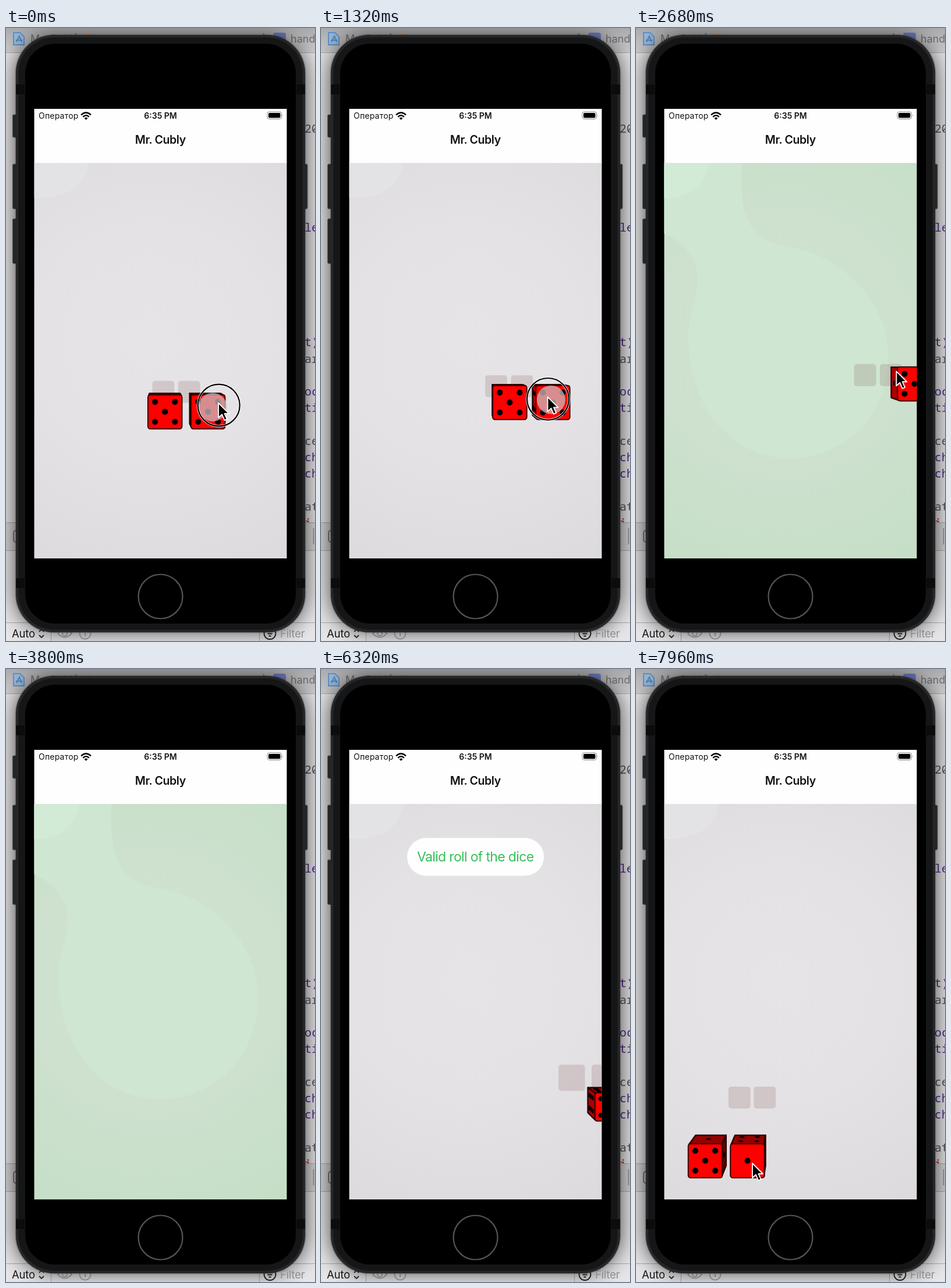
These frames come from a looping animation (531 px wide and 1054 px high, 8 s). An HTML page:

```html
<!DOCTYPE html>
<html>
<head>
<meta charset="utf-8">
<style>
  html, body { margin: 0; width: 100%; height: 100%; overflow: hidden; background: #c9c8ca; }
  svg { display: block; width: 531px; height: 1054px; }
  text { font-family: Inter, "Noto Sans", sans-serif; white-space: pre; }
  .code text { font-family: "Noto Sans Mono", monospace; font-size: 20px; }
</style>
</head>
<body>
<svg viewBox="0 0 531 1054" xmlns="http://www.w3.org/2000/svg">
  <defs>
    <filter id="blur" x="-30%" y="-20%" width="160%" height="140%"><feGaussianBlur stdDeviation="19"/></filter>
    <filter id="soft"><feGaussianBlur stdDeviation="0.8"/></filter>
    <clipPath id="screen"><rect x="48.5" y="232" width="434" height="680"/></clipPath>
    <clipPath id="editor"><rect y="42" width="531" height="808"/></clipPath>
    <linearGradient id="topBar" x2="0" y2="1">
      <stop offset="0" stop-color="#aaa9ab"/><stop offset="1" stop-color="#d0cfd1"/>
    </linearGradient>
    <radialGradient id="grey" gradientUnits="userSpaceOnUse" cx="250" cy="540" r="440">
      <stop offset="0" stop-color="#e6e4e7"/><stop offset=".45" stop-color="#e4e2e5"/><stop offset="1" stop-color="#dcdadd"/>
    </radialGradient>
    <radialGradient id="green" gradientUnits="userSpaceOnUse" cx="250" cy="540" r="440">
      <stop offset="0" stop-color="#cfe3d0"/><stop offset=".5" stop-color="#cde1ce"/><stop offset="1" stop-color="#c5dec6"/>
    </radialGradient>
  </defs>

  <!-- desktop -->
  <rect width="531" height="1054" fill="#e6e5e7"/>
  <rect width="531" height="42" fill="url(#topBar)"/>
  <rect y="850" width="531" height="48" fill="#d6d5d7"/>
  <path d="M0 42.5H531M0 850.5H531M0 898.5H531M0 1022.5H531M77.5 1022V1054M435.5 1022V1054" stroke="#a9a8aa" fill="none"/>
  <rect x="13" y="864" width="20" height="20" rx="4" fill="none" stroke="#77767a" stroke-width="2"/>
  <path d="M528.5 860V888" stroke="#8b8a8d" stroke-width="1.5"/>
  <g class="code" id="code" clip-path="url(#editor)"></g>
  <g opacity=".75">
    <path d="M13 8h11l7 7v14H13z" fill="#8fbbe8" stroke="#4388cd" stroke-width="2"/>
    <path d="M18 24l5-10 4 10M17 21h11" stroke="#3379bd" stroke-width="2" fill="none"/>
    <text x="42" y="25" font-size="18" fill="#555">Mr. Cubly</text>
    <path d="M119 9l5 9-5 9M442 9l5 9-5 9" fill="none" stroke="#666" stroke-width="2"/>
    <path d="M137 10h9l3 3h12v14H137z" fill="#e19a56"/>
    <rect x="459" y="8" width="22" height="21" rx="4" fill="#5569c4"/>
    <text x="489" y="25" font-size="18" fill="#555">hand</text>
  </g>
  <g fill="none" stroke="#aaa9ac" stroke-width="2">
    <path d="M89 1041q12-13 24 0q-12 13-24 0z"/><circle cx="101" cy="1041" r="4"/>
    <circle cx="136" cy="1041" r="9.5"/><path d="M136 1040v6M136 1035v2"/>
  </g>
  <rect x="17" y="16" width="497" height="1020" rx="64" opacity=".72" filter="url(#blur)"/>
  <text x="10" y="1048" font-size="18.5" letter-spacing="-.2" fill="#151515">Auto</text>
  <path d="M57 1038l4-4 4 4M57 1044l4 4 4-4" fill="none" stroke="#222" stroke-width="1.8"/>
  <g fill="none" stroke="#1b1b1b" stroke-width="1.8">
    <circle cx="453.5" cy="1041" r="10"/><path d="M447.5 1037.5h12M449.5 1041.5h8M451.5 1045.5h4"/>
  </g>
  <text x="471" y="1048" font-size="18.5" letter-spacing="-.2" fill="#8d8c8f">Filter</text>

  <!-- phone -->
  <g fill="#242526" stroke="#4a4b4d">
    <rect x="11.5" y="149" width="10" height="39" rx="2"/>
    <rect x="11.5" y="234" width="10" height="77" rx="2"/>
    <rect x="11.5" y="328" width="10" height="77" rx="2"/>
    <rect x="509" y="234" width="9" height="77" rx="2"/>
  </g>
  <rect x="17" y="12" width="497" height="1027" rx="66" fill="#151617"/>
  <rect x="19" y="14" width="493" height="1023" rx="64" fill="none" stroke="#2a2b2c" stroke-width="4" filter="url(#soft)"/>
  <path d="M17 97h15v17H17zM499 97h15v17h-15zM17 946h15v17H17zM499 946h15v17h-15z" fill="#0c0c0d"/>
  <rect x="33" y="27" width="465" height="997" rx="51"/>
  <circle cx="265.5" cy="977.5" r="38" stroke="#555557" stroke-width="2.2"/>

  <!-- app -->
  <rect x="48.5" y="139" width="434" height="94" fill="#fffeff"/>
  <text x="56" y="156" font-size="14" letter-spacing=".2" fill="#111">Оператор</text>
  <path d="M129 149.5q8.500-8 17 0M132.200 152.800q5.300-5 10.600 0" fill="none" stroke="#000" stroke-width="2.4"/>
  <path d="M134.500 155q3-2.500 6 0l-3 3z"/>
  <text x="265.5" y="156" font-size="14" font-weight="600" text-anchor="middle" fill="#111">6:35 PM</text>
  <rect x="449" y="144" width="24.5" height="12.5" rx="3.5" fill="none" stroke="#888"/>
  <rect x="451" y="146" width="20.5" height="8.5" rx="2"/>
  <path d="M475 148.500q1.800 1.700 0 3.500z" fill="#888"/>
  <text x="265.3" y="199" font-size="19.5" font-weight="600" letter-spacing="-.4" text-anchor="middle" fill="#111">Mr. Cubly</text>

  <g clip-path="url(#screen)">
    <g id="greyBg">
      <rect x="48" y="232" width="435" height="680" fill="url(#grey)"/>
      <path d="M48 232H142Q132 294 48 292z" fill="#e6e8e9" opacity=".6"/>
    </g>
    <g id="greenBg">
      <rect x="48" y="232" width="435" height="680" fill="url(#green)"/>
      <path d="M48 232H181C176 340 205 368 264 377C350 392 433 465 433 566C433 665 360 740 265 740C168 740 90 655 90 530C90 485 107 465 106 428C104 390 78 367 48 353z" fill="#cfe7d2"/>
      <path d="M48 232H126Q114 292 48 293z" fill="#d2ebd7"/>
    </g>
    <g id="label">
      <rect x="148" y="290.5" width="235" height="65" rx="32.5" fill="#fffeff"/>
      <text x="265.2" y="331" font-size="23" letter-spacing="-.66" text-anchor="middle" fill="#37bf59">Valid roll of the dice</text>
    </g>
    <g id="dice"></g>
    <circle id="touch" r="24.5" fill="#c9c4c6" opacity=".72"/>
  </g>
  <g id="ring" fill="none">
    <circle r="36" stroke="#fff" stroke-width="4" opacity=".85"/>
    <circle r="36" stroke="#000" stroke-width="2.2"/>
  </g>
  <path id="cursor" d="M0 0V25L6 19.500L10.300 29.500L14.700 27.600L10.400 18H18z" stroke="#fff" stroke-width="1.8" stroke-linejoin="round"/>
</svg>
<script>
const LOOP = 8000, STEP = 40;
const RELEASE = 2480, VALID = 5120, ROLL = 6120, LABEL_END = 7200, REST = 7640, BACK = 7050;
const VX = 266, VY = 574, DEPTH = 0.065;

const $ = id => document.getElementById(id);
const f = v => v.toFixed(2);
const mix = (a, b, u) => a + (b - a) * u;
const show = (id, on) => $(id).style.display = on ? '' : 'none';
const place = (id, x, y) => $(id).setAttribute('transform', `translate(${f(x)} ${f(y)})`);

// one entry per line of the editor behind the phone
$('code').innerHTML = '20,,,,,,le,,,,,,,t),ar,,oc,ti,,ce,ch,ch,,at,i'.split(',').map((word, row) => {
  const color = word === 'i' ? '#b3261e' : /le|t\)|oc|ti|ch/.test(word) ? '#4f2a8a' : '#55545a';
  return word && `<text x="513" y="${180 + row * 28.25}" fill="${color}">${word}</text>`;
}).join('');

// the finger sways while it holds the dice
function finger(t) {
  const x = 386.6 + 21.6 * Math.sin(t / 1050 * 2 * Math.PI - 1.483);
  return [x, 645 - 0.6 * (x - 365) + 0.003 * t];
}

function pointer(t) {
  if (t >= BACK) {
    const e = ((LOOP - STEP - t) / (LOOP - STEP - BACK)) ** 2;
    return [200 + 340 * e, 850 + 18 * e];
  }
  const [x, y] = finger(Math.min(t, RELEASE)), late = Math.max(0, t - RELEASE);
  return [x + 0.2275 * late, y - 0.2 * late];
}

// left die's place, floor ratio s, gap to the right die, turn and faces
function dicePose(t) {
  if (t < ROLL) {
    const [x, y] = finger(Math.min(t, RELEASE)), late = Math.max(0, t - RELEASE);
    return { x: 273 + 2.1 * (x - 365) + 0.64 * late, y: 660 + 1.5 * (y - 645) - 0.13 * late,
      s: 0.6, gap: 74, turn: 0, faces: [[5, 1], [5, 4]] };
  }
  const e = Math.max(0, (REST - t) / 1320) ** 1.6;
  const face = n => (n - 1 + Math.round(e * 5)) % 6 + 1;
  return { x: mix(119, 495, e), y: mix(845.5, 753, e), s: mix(0.6, 0.72, e), gap: mix(72.5, 79, e),
    turn: -360 * (1 - e), faces: [[face(5), face(1)], [face(1), face(4)]] };
}

function pips(n) {
  const out = n % 2 ? [[0, 0]] : [];
  if (n > 1) out.push([-1, -1], [1, 1]);
  if (n > 3) out.push([-1, 1], [1, -1]);
  if (n === 6) out.push([-1, 0], [1, 0]);
  return out;
}

const poly = (pts, fill, stroke, width) =>
  `<path d="M${pts.map(p => p.map(f)).join('L')}z" fill="${fill}" stroke="${stroke}" stroke-width="${width}" stroke-linejoin="round"/>`;
const recede = ([x, y], k) => [mix(x, VX, k), mix(y, VY, k)];

function shadow(x, y, s, turn) {
  const [cx, cy] = recede([x, y], 1 - s), w = 63 * s;
  return `<rect x="${f(-w / 2)}" y="${f(-w / 2)}" width="${f(w)}" height="${f(w)}" rx="5" fill="#6b3434" opacity=".16"
    transform="translate(${f(cx)} ${f(cy)}) rotate(${f(turn)})"/>`;
}

function die(x, y, h, turn, [front, side]) {
  const a = turn * Math.PI / 180, c = Math.cos(a), s = Math.sin(a);
  const at = (u, v) => [x + u * c - v * s, y + u * s + v * c];
  const square = r => [at(-r, -r), at(r, -r), at(r, r), at(-r, r)];
  const edge = square(h - 2);
  let out = '';
  edge.forEach((p, i) => {
    const q = edge[(i + 1) % 4];
    const mx = (p[0] + q[0]) / 2, my = (p[1] + q[1]) / 2, nx = (mx - x) / h, ny = (my - y) / h;
    const depth = DEPTH * (nx * (VX - mx) + ny * (VY - my));
    if (depth <= 0) return;
    const shade = nx < -0.5 ? '#b00000' : nx > 0.5 ? '#5c0000' : '#960000';
    out += poly([p, q, recede(q, DEPTH), recede(p, DEPTH)], shade, '#2a0000', 2.5);
    if (depth < 6) return;
    const tilt = turn + i * 90;
    for (const [m, n] of pips(side)) {
      const w = 0.5 + m * 0.25;
      const g = recede([mix(p[0], q[0], w), mix(p[1], q[1], w)], DEPTH * (0.58 - n * 0.22));
      out += `<ellipse rx="4.5" ry="1.6" transform="translate(${g.map(f)}) rotate(${f(tilt)})"/>`;
    }
  });
  const core = square(h - 5);
  out += poly(core, '#300000', '#300000', 10.5) + poly(core, '#fe0000', '#fe0000', 6.5);
  for (const [m, n] of pips(front)) {
    const [px, py] = at(m * h * 0.57, n * h * 0.57);
    out += `<circle cx="${f(px)}" cy="${f(py)}" r="${f(h * 0.17)}"/>`;
  }
  return out;
}

function drawDice(t) {
  const { x, y, s, gap, turn, faces } = dicePose(t), h = 18 / s;
  return shadow(x, y, s, turn) + shadow(x + gap, y, s, turn) +
    die(x, y, h, turn, faces[0]) + die(x + gap, y, h, turn, faces[1]);
}

function render(t) {
  const held = t < RELEASE, rolling = t >= RELEASE && t < VALID;
  show('greyBg', !rolling);
  show('greenBg', rolling);
  show('label', t >= VALID && t < LABEL_END);
  show('ring', held);
  show('touch', held);
  $('dice').innerHTML = drawDice(t);

  const [x, y] = pointer(t);
  place('cursor', x, y);
  place('ring', x + 0.6, y + 3.7);
  place('touch', 355 + 1.65 * (x - 365), 652 + 1.2 * (y - 645));
}

const start = performance.now();
function tick() {
  const t = (performance.now() - start) % LOOP;
  render(Math.floor(t / STEP) * STEP);
  requestAnimationFrame(tick);
}
tick();
</script>
</body>
</html>
```
